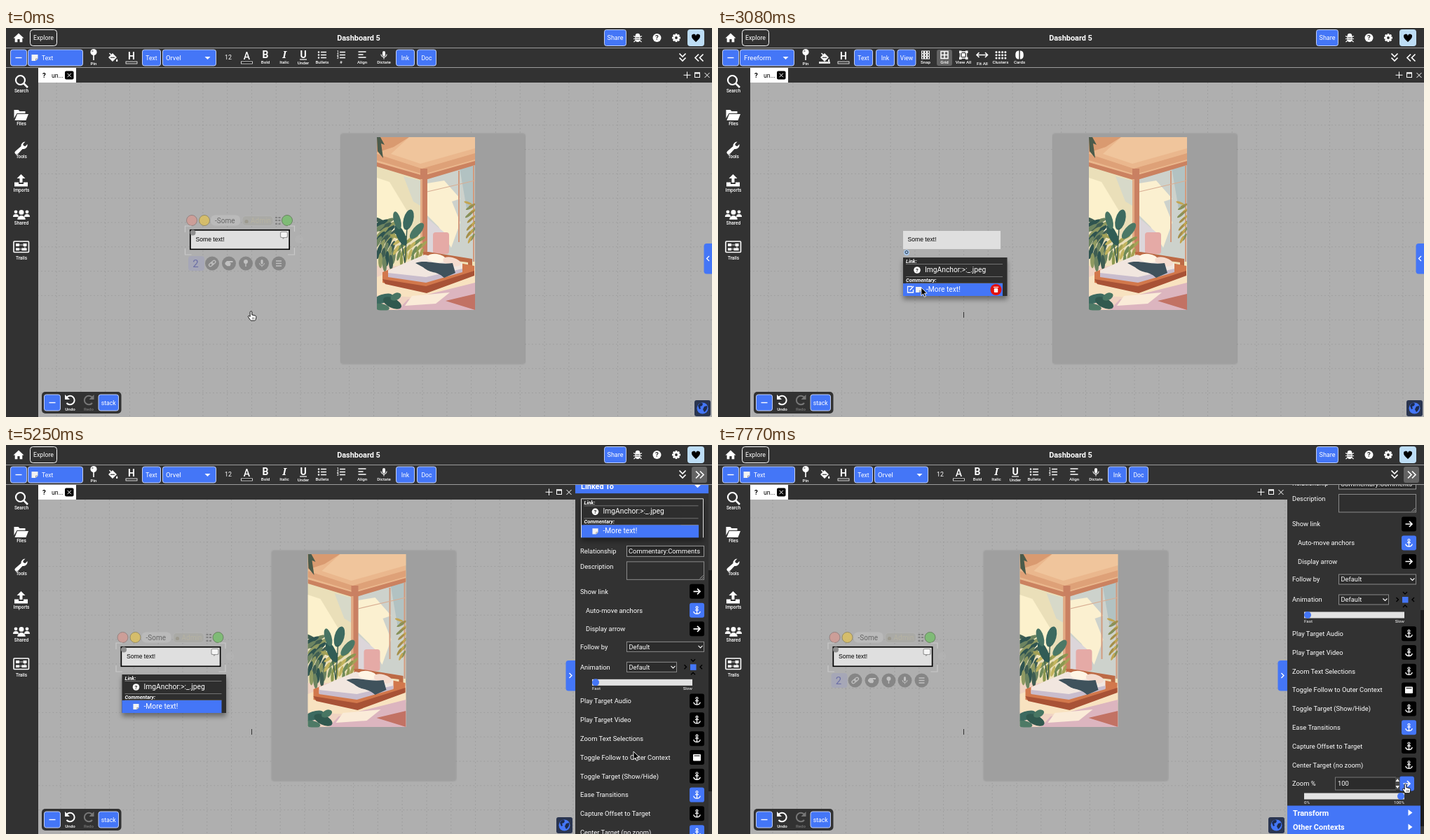
Write an HTML page that moves like this. It is 1007x556 px and loops after 8000 ms.

```html
<!DOCTYPE html>
<html lang="en">
<head>
<meta charset="utf-8">
<title>Dashboard</title>
<style>
html, body { margin: 0; width: 100%; height: 100%; overflow: hidden; background: #323232; }
svg { display: block; width: 100vw; height: 100vh; font-family: Roboto, sans-serif; }
</style>
</head>
<body>
<svg id="stage" viewBox="0 0 1007 556"></svg>
<script>
const DARK = '#323232', BLUE = '#4476f7', LIGHT = '#dfdfdf', MID = '#9f9f9f', WHITE = '#fff';

const rect = (x, y, w, h, fill, rx = 0, more = '') =>
  `<rect x="${x}" y="${y}" width="${w}" height="${h}" rx="${rx}" fill="${fill}" ${more}/>`;
const circle = (x, y, r, fill, more = '') => `<circle cx="${x}" cy="${y}" r="${r}" fill="${fill}" ${more}/>`;
const fillPath = (d, fill = WHITE, more = '') => `<path d="${d}" fill="${fill}" ${more}/>`;
const line = (d, stroke = WHITE, w = 1.4, more = '') =>
  `<path d="${d}" fill="none" stroke="${stroke}" stroke-width="${w}" ${more}/>`;
const at = (x, y, body) => `<g transform="translate(${x} ${y})">${body}</g>`;
const group = (id, body) => `<g id="${id}">${body}</g>`;
// y is the vertical middle of the text
const text = (x, y, size, s, fill = WHITE, more = '') =>
  `<text x="${x}" y="${y + size * .355}" font-size="${size}" fill="${fill}" ${more}>${s}</text>`;
const MIDDLE = 'text-anchor="middle"', BOLD = 'font-weight="700"', ITALIC = 'font-weight="700" font-style="italic"';
const label = (x, y, s, size = 6.2, fill = WHITE) => text(x, y, size, s, fill, MIDDLE + ' font-weight="500"');
const button = (x, y, w, h, s = '', size = 8.6) =>
  rect(x + .5, y + .5, w - 1, h - 1, BLUE, 3, 'stroke="#d3ddfb" stroke-width=".9"') +
  (s ? text(x + w / 2, y + h / 2, size, s, WHITE, MIDDLE) : '');
const minus = (x, y) => button(x, y, 24, 24) + line(`M${x + 7.5} ${y + 12}h9`);
const note = (x, y, s = 1) => at(x, y,
  `<g transform="scale(${s})">${fillPath('M-4.5-4.5h9v6l-3 3h-6z', '#f2f2f2')}${line('M1.5 4.5v-3h3', '#888', .8)}</g>`);
const mark = (x, y, r, fill = WHITE, ink = DARK) =>
  circle(x, y, r, fill) + text(x, y, r * 1.6, '?', ink, MIDDLE + ' ' + BOLD);

function topBar() {
  let teeth = '';
  for (let a = 0; a < 360; a += 45) teeth += rect(-1.4, -6, 2.8, 3, WHITE, .5, `transform="rotate(${a})"`);
  return rect(0, 0, 1007, 57, DARK) + line('M0 28.5H1007M0 56.5H1007', '#a8a8a8', .9) +
    at(18, 14, fillPath('M0-6.5L7.5.5H5.3V6.2H1.6V2H-1.6V6.2H-5.3V.5H-7.5z')) +
    rect(34.5, 2.5, 38, 23, 'none', 4, 'stroke="#fff"') + text(53.5, 14, 8.8, 'Explore', WHITE, MIDDLE) +
    text(503, 14, 10.9, 'Dashboard 5', WHITE, MIDDLE + ' ' + BOLD) +
    button(853, 2, 32, 24, 'Share', 9) +
    at(901, 14, fillPath('M-3.5-2a3.5 4.3 0 0 1 7 0v4a3.5 4 0 0 1-7 0z') +
      line('M-6-2.5L-3-1M6-2.5L3-1M-6 1.5H6M-5.5 6L-3 3.6M5.5 6L3 3.6', WHITE, 1.1) + line('M-2.5-.4h5M-2.5 2h5', DARK, .8)) +
    mark(928.5, 14, 6) + at(956, 14, teeth + circle(0, 0, 4.5, WHITE) + circle(0, 0, 1.9, DARK)) +
    rect(972, 2, 24, 24, '#bdddf5', 4) +
    at(984, 14.5, fillPath('M0 5.5C-4 2-6-.2-6-2.4A3 3 0 0 1 0-3.3 3 3 0 0 1 6-2.4C6-.2 4 2 0 5.5z', '#000'));
}

function commonTools() {
  return minus(6, 30.5) +
    circle(125, 34.5, 4.6, WHITE) + line('M125 38v8', WHITE, 1.6) + circle(123.4, 33, 1.2, '#999') + label(125, 50.5, 'Pin') +
    at(152, 42, fillPath('M-6 0L0-6 6 0 0 6zM6.3 2c1.3 1.8 1.6 4-.2 4s-1.2-2.4.2-4z') + line('M-4.5-6L0-1.5') + line('M-3 .2h6', DARK, 1.2)) +
    text(179, 40.5, 14, 'H', WHITE, MIDDLE + ' ' + BOLD) + rect(171, 48, 16, 3, DARK, 0, 'stroke="#fff" stroke-width=".8"') +
    button(194, 30.5, 27, 24, 'Text') +
    line('M960.5 36.5l4.5 4.5 4.5-4.5M960.5 42.5l4.5 4.5 4.5-4.5', WHITE, 1.7) +
    group('sideHi', rect(978, 31, 22, 23, '#636363', 3)) +
    '<path id="sideChev" fill="none" stroke="#fff" stroke-width="1.7"/>';
}

function textTools() {
  const bars = (x, y, ws) => line(ws.map((w, i) => `M${x} ${y + i * 4}h${w}`).join(''), WHITE, 1.6);
  const glyph = (x, s, more) => text(x, 38.5, 14, s, WHITE, MIDDLE + ' ' + more);
  return button(31, 30.5, 79, 24) + note(41, 42.5) + text(51, 42.5, 8.6, 'Text') +
    button(223, 30.5, 77, 24) + text(228, 42.5, 9.5, 'Orvel') + fillPath('M283.5 41h8l-4 4z') +
    text(317, 42, 8.8, '12', WHITE, MIDDLE) +
    text(343.5, 40, 14, 'A', WHITE, MIDDLE + ' font-weight="500"') + rect(335.5, 48, 16, 3, '#000', 0, 'stroke="#fff" stroke-width=".8"') +
    glyph(370, 'B', BOLD) + label(370, 49, 'Bold') +
    glyph(397, 'I', ITALIC + ' font-family="Noto Serif, serif"') + label(397, 49, 'Italic') +
    glyph(424, 'U', BOLD) + line('M419 45h10', WHITE, 1.2) + label(424, 49.5, 'Under') +
    bars(449, 34.5, [8, 8, 8]) + [34.5, 38.5, 42.5].map(y => circle(446, y, 1.2, WHITE)).join('') + label(451, 49, 'Bullets') +
    bars(476, 34.5, [8, 8, 8]) + [1, 2, 3].map(n => text(472, 30.5 + n * 4, 4.5, n, WHITE, BOLD)).join('') + label(478, 49, '#') +
    bars(502.5, 34, [11, 7, 11]) + label(508, 49, 'Align') +
    at(539, 38, rect(-2, -5, 4, 7.5, WHITE, 2) + line('M-4-.5a4 4 0 0 0 8 0M0 3.5v3', WHITE, 1.1)) + label(539, 49, 'Dictate') +
    button(556, 30.5, 27, 24, 'Ink') + button(586, 30.5, 28, 24, 'Doc');
}

function freeTools() {
  let snap = '', dots = '';
  for (let i = 0; i < 9; i++) snap += rect(290.5 + i % 3 * 4, 33 + Math.floor(i / 3) * 4, 3, 3, 'none', 0, 'stroke="#fff"');
  for (let i = 0; i < 12; i++) dots += circle(397 + i % 4 * 4.3, 34.5 + Math.floor(i / 4) * 4.2, 1.5, WHITE);
  return button(31, 30.5, 78, 24) + text(37, 42.5, 9.6, 'Freeform') + fillPath('M92.5 41h8l-4 4z') +
    rect(144, 48, 16, 3, LIGHT) + button(225, 30.5, 27, 24, 'Ink') + button(255.5, 30.5, 27, 24, 'View') +
    snap + label(296, 49, 'Snap') +
    rect(312, 31, 22, 23, '#636363', 3) + line('M318 33.5h10v10h-10zM323 33.5v10M318 38.5h10', WHITE, 1.5) + label(323, 49, 'Grid') +
    line('M345.5 34h9v9h-9z', WHITE, 1.3) + [[344, 32.5], [353, 32.5], [344, 41.5], [353, 41.5]].map(p => rect(...p, 3.5, 3.5, WHITE)).join('') +
    rect(347.5, 36, 5, 5, WHITE) + label(350, 49, 'View All') +
    line('M369.5 38.5h14M372.5 35l-3.5 3.5 3.5 3.5M381 35l3.5 3.5-3.5 3.5', WHITE, 1.6) + label(377, 51, 'Fit All') +
    dots + label(403, 49, 'Clusters') +
    fillPath('M429.3 32.5v12c-3.5 0-5-2-5-6s1.5-6 5-6zM430.8 32.5v12c3.5 0 5-2 5-6s-1.5-6-5-6z') + label(430, 49, 'Cards');
}

function sidebar() {
  const person = (x, y, s) => circle(x, y - 4 * s, 3 * s, WHITE) + fillPath(`M${x - 5 * s} ${y + 5 * s}a${5 * s} ${5 * s} 0 0 1 ${10 * s} 0z`);
  const names = ['Search', 'Files', 'Tools', 'Imports', 'Shared', 'Trails'], ys = [89.5, 136.5, 184, 232, 278.5, 328.5];
  return rect(0, 57, 46, 499, DARK) +
    circle(20.5, 74.5, 6.5, 'none', 'stroke="#fff" stroke-width="2.2"') + line('M25 79l6 6', WHITE, 2.6) +
    at(21.5, 124, fillPath('M-10-7h6l2 2H6v3H-6L-10 5zM-5.5-1H10.5L7 8H-9z')) +
    at(21.5, 171, fillPath('M-8 5L0-2A6 6 0 0 1 6-8.5L2.7-5 3.5-2.7 6-2 9-5A6 6 0 0 1 2 2L-4.5 9A2.6 2.6 0 0 1-8 5z')) +
    at(21.5, 218, fillPath('M-2 3V-3H-6L0-9 6-3H2V3zM-9.5 2.5h6v2.5h7V2.5h6V8.5h-19z')) +
    person(14, 266, .8) + person(30, 266, .8) + person(22, 268, 1.15) +
    rect(11, 305, 21.5, 15.5, 'none', 1, 'stroke="#fff" stroke-width="1.6"') +
    rect(14, 308, 5, 4, WHITE) + rect(24.5, 308, 5, 4, WHITE) + rect(14, 314.5, 5, 3.5, WHITE) + rect(22.5, 314.5, 7, 3.5, WHITE) +
    line('M19 310h5M27 312v3M19 316h4', WHITE, .8) +
    names.map((n, i) => label(22, ys[i], n, 6.5)).join('');
}

function picture() {
  const leaf = (x, y, rx, ry, a, c) => `<ellipse cx="${x}" cy="${y}" rx="${rx}" ry="${ry}" fill="${c}" transform="rotate(${a} ${x} ${y})"/>`;
  // A cluster of leaves scattered evenly over a w by h area
  const bush = (x, y, w, h, n, size, colors) => Array.from({ length: n }, (_, i) =>
    leaf(x + i * .618 % 1 * w, y + i / n * h, size * .28, size, i * 137 % 140 - 70, colors[i % colors.length])).join('');
  return rect(0, 0, 140, 247, '#f0e2b9') +
    fillPath('M0 40L62 58V168H0z', '#eadfb9') + fillPath('M0 58L18 64 47 112 36 152 0 128z', '#fcf1cc') + fillPath('M38 56L62 62V98L52 92z', '#d7d9c9') +
    fillPath('M70 56L140 38V178H70z', '#cdd2cc') + fillPath('M118 44L140 38V96L128 102z', '#b2c2c2') +
    fillPath('M72 66L96 62 119 88 107 92 119 122 106 158 88 128 72 112z', '#fbf0d0') + fillPath('M72 116L96 136 100 165H72z', '#dcd6da') +
    fillPath('M0 0H140V38L66 60 0 38z', '#eab78d') + fillPath('M0 0H46L24 14 0 22z', '#d99a70') + fillPath('M46 0H140V16L62 38 20 24z', '#f0c59c') +
    fillPath('M0 24L64 45 140 23V32L66 53 0 33z', '#dea178') + fillPath('M0 36L66 55 140 34V40L66 62 0 42z', '#cb8260') +
    fillPath('M62 45h10v121h-10z', '#c98062') + rect(62, 60, 3, 106, '#e3ab85') + line('M117 48V150M138 40V178', '#d29a7e', 2) + line('M72 78L140 62', '#d8ad92', 1.2) +
    fillPath('M0 0h5l6 11-5-2 3 21L1 20z', '#4b5b4b') +
    rect(0, 184, 140, 63, '#f0d3c2') + fillPath('M0 200L45 182 140 188V212L80 230 0 226z', '#f8e2c0') +
    fillPath('M44 232L140 208V247H30z', '#dcb5bf') + fillPath('M98 234L140 224V247z', '#c27264') + fillPath('M50 227L104 222 84 238 40 241z', '#faebd8') +
    bush(0, 118, 24, 66, 26, 11, ['#3f5d52', '#6d8460', '#2f5450', '#8f9a62']) + bush(26, 142, 42, 36, 24, 8, ['#a5a256', '#c3b45f', '#6f8a59', '#8b9850']) +
    bush(130, 94, 10, 56, 16, 6, ['#c2a552', '#a48f4a', '#87915a']) +
    leaf(45, 118, 7, 15, 15, '#3c6a60') + leaf(34, 140, 6, 16, -25, '#315c55') + leaf(57, 134, 6, 14, 40, '#4b7866') + leaf(29, 119, 5, 13, -15, '#477363') +
    line('M43 130L40 180M35 150L40 180', '#31564f', 1.3) +
    rect(80, 136, 23, 31, '#e5aaa6', 4) + fillPath('M66 164h8l62 10v14h-6v-9L66 171z', '#bd6a45') +
    fillPath('M8 193L66 170 139 184V197L71 222 8 208z', '#d2784c') + fillPath('M8 203L70 213 139 191V198L71 223 12 210z', '#a85236') +
    fillPath('M16 190L68 168 122 180V192L70 207 16 199z', '#f1e6df') + fillPath('M16 194L70 200 122 188V193L70 208 16 200z', '#c9bdcd') +
    leaf(85, 173, 13, 6, 8, '#fff5e4') + leaf(107, 178, 13, 6, 15, '#f4dccf') +
    fillPath('M55 180C70 174 85 183 108 180L112 194 96 201C84 190 78 196 66 186z', '#3f525c') +
    leaf(8, 231, 15, 6, -20, '#3c6a60') + leaf(22, 237, 14, 7, 25, '#31594f') + leaf(6, 243, 12, 5, 10, '#4e7a66') + leaf(27, 228, 8, 5, -25, '#487663');
}

// Link menu, laid out at its place on the canvas
function linkMenu(row) {
  const rule = y => line(`M268 ${y}H406`, '#a0a0a0', .6);
  return text(268, 333, 7.4, 'Link:', WHITE, ITALIC) + rule(337.5) + mark(284, 346, 4.8) + text(295, 345.5, 10.25, 'ImgAnchor:&gt;:_.jpeg') +
    rule(355.5) + text(268, 360.5, 7.4, 'Commentary:', WHITE, ITALIC) + rule(365) + row;
}
const moreRow = note(284, 374, .9) + text(295, 373.2, 10.25, '-More text!');

function decorations() {
  const round = [294, 318, 342, 365, 389].map(x => circle(x, 336.5, 10, '#828282')).join('');
  const link = rect(-5.5, -2, 6.5, 4, 'none', 2, 'stroke="#c3c3c3" stroke-width="1.3"') + rect(-1, -2, 6.5, 4, 'none', 2, 'stroke="#c3c3c3" stroke-width="1.3"');
  return `<g opacity=".8">` +
    circle(265, 275, 7.5, '#d49a93', 'stroke="#8d7775"') + circle(283, 275, 7.5, '#dfc15b', 'stroke="#8d8357"') +
    rect(292, 267.5, 42, 15, '#bdbdbd', 6) + text(298, 275, 10, '-Some', '#555') +
    rect(337, 268.5, 44, 14, '#a9a9a5', 5, 'stroke="#bbb" stroke-width=".6"') + circle(343, 276.5, 2.6, '#989487') + text(349, 275.5, 10, 'Admin', '#bab59f') +
    line('M384 271h8M384 275h8M384 280h8', '#666', 1.5, 'stroke-dasharray="3 1.5"') + circle(401, 275, 7.5, '#74bf68', 'stroke="#58764f"') + '</g>' +
    line('M255.5 292v-9h9M402 324h9.5v-10M255.5 315v9h9M402 283h9.5v8', '#c9c9c9', 1.2) + circle(418, 302, 6, '#b7b7b7', 'opacity=".4"') +
    circle(266.5, 292.5, 4, '#8e8e8e') +
    group('decoBtns', `<g opacity=".9">${rect(260, 326, 23, 21, '#a6a7b8', 4)}${text(270.5, 336.5, 15, '2', '#6468a6', MIDDLE)}${round}` +
      at(294.2, 336.5, `<g transform="rotate(-40)">${link}</g>`) +
      fillPath('M312.5 335.5l2.5-2.5h8.5v2h-4v1.300h1.500l-1.500 4h-4l-3-2.500z', '#c3c3c3') + circle(342, 334, 3, '#c3c3c3') + line('M342 335v6', '#c3c3c3') +
      rect(363.5, 331, 3, 6.5, '#c3c3c3', 1.5) + line('M361.5 336a3.5 3.5 0 0 0 7 0M365 339.5v2', '#c3c3c3', 1) +
      line('M385 333h8M385 336.5h8M385 340h8', '#c3c3c3', 1.3) + '</g>');
}

function world() {
  let grid = '';
  for (let i = 0; i < 34; i++) grid += `M${2.5 + i * 34.8} 78V556`;
  for (let i = 0; i < 13; i++) grid += `M-20 ${104 + i * 34.8}H1140`;
  return line(grid, '#999', .8, 'stroke-dasharray="1.7 3.3"') +
    rect(478, 151.5, 262, 328, MID, 2, 'filter="url(#soft)"') + at(529, 156, `<g clip-path="url(#pic)">${picture()}</g>`) +
    rect(264, 290, 139, 26, LIGHT) +
    group('noteSel', rect(262.8, 288.7, 141.4, 27.6, 'none', 0, 'stroke="#000" stroke-width="1.6"') +
      rect(391.5, 291.5, 10, 8, '#f4f4f4', 2, 'stroke="#999" stroke-width="1.2"') + fillPath('M394 299.5l1 2.5 3-2.5z', '#999')) +
    text(270.5, 302, 8.6, 'Some text!', '#000', 'font-family="Liberation Sans, sans-serif"') +
    group('linkDot', circle(269, 321, 4.2, '#a9c7ea') + circle(269, 320.5, 2, 'none', 'stroke="#234"')) +
    group('deco', decorations()) +
    group('menu', rect(264, 328, 148.5, 55, '#2d2d2d', 0, 'filter="url(#drop)"') +
      linkMenu(group('rowBg', rect(264, 365, 142, 18, BLUE)) + group('row', moreRow) +
        group('rowTools', line('M277 369.5h-6.5v8.5h8v-4M273.5 375l5.5-6', WHITE, 1.3) +
          circle(396.5, 374, 8, '#e3120b') + rect(393.8, 372, 5.4, 6, WHITE, 1) + line('M393 370.5h7', WHITE, 1.2)))) +
    group('tip', rect(250.5, 391, 49, 22, '#616161', 3) + text(275, 402, 8.4, 'Edit Link', WHITE, MIDDLE + ' ' + BOLD));
}

const ANCHOR = line('M0-2.5V5M-2.5-.5h5M-4.8 1.5C-4 4.5-2 5 0 5S4 4.5 4.8 1.5', WHITE, 1.3) + circle(0, -4, 1.5, 'none', 'stroke="#fff" stroke-width="1.1"');
const ARROW = line('M-5 0H4.5M.5-4L4.5 0 .5 4', WHITE, 1.7);
const WINDOW = rect(-5.5, -4.5, 11, 9.5, WHITE, 1) + line('M-4-2.3h8', '#000', 1);
const tile = (y, icon, fill = '#000', x = 985.5) => rect(x - 10.5, y - 10.5, 21, 21, fill, 3) + at(x, y, icon);
const slider = (y, knob, a, b) => rect(836, y - 4.5, 143, 9, '#e2e2e2') + circle(knob, y, 5, BLUE) +
  text(836, y + 8.7, 6.2, a) + text(979, y + 8.7, 6.2, b, WHITE, 'text-anchor="end"');
const band = (y, s, tri = 'M984.5-4.5L990.5 0 984.5 4.5z') => rect(812, y, 190, 20.8, BLUE) +
  text(820, y + 10.4, 10.9, s, WHITE, BOLD) + at(0, y + 10, fillPath(tri));
const row = (y, s, x = 819) => text(x, y, 9.4, s);
const select = (y, w) => rect(885.5, y - 7, w, 14, '#2b2b2b', 0, 'stroke="#8a8a8a"') + text(888.5, y, 9.3, 'Default') +
  line(`M${877.5 + w} ${y - 1.5}l3 3 3-3`, WHITE, 1.1);

function panel() {
  const options = [['Play Target Audio', ANCHOR], ['Play Target Video', ANCHOR], ['Zoom Text Selections', ANCHOR], ['Toggle Follow to Outer Context', WINDOW],
    ['Toggle Target (Show/Hide)', ANCHOR], ['Ease Transitions', ANCHOR, BLUE], ['Capture Offset to Target', ANCHOR]];
  return rect(812, 57, 195, 499, DARK) + `<g clip-path="url(#side)">` + group('scroll',
    text(820, 78, 18.7, 'Properties', WHITE, BOLD) + circle(920, 92, 6, WHITE) + text(920, 92, 9, 'i', DARK, MIDDLE + ' ' + BOLD) +
    text(820.5, 121, 8.1, 'TITLE', '#d5d5d5') + rect(820.5, 127.5, 174, 23.5, 'none', 4, 'stroke="#e4e4e4"') + text(825, 139.5, 9.5, '-Some text!') +
    text(820, 161.5, 9.3, '<tspan font-weight="700">Anchor:</tspan>-Some text!') +
    text(820, 175, 9.3, '<tspan font-weight="700">Link:</tspan>-Some text! (Commentary:Comme...') +
    row(196, 'Type', 820) + fillPath('M821.5 205.5h5l2.5 2.5v7h-7.5z') + line('M823 210h4M823 212.5h4', DARK, .8) +
    text(833, 210, 9.6, 'Text', WHITE, 'text-decoration="underline"') +
    band(220.5, 'Options') + band(241, 'Linked To', 'M981.5-2L991.5-2 986.5 3z') +
    rect(820.5, 269.5, 174, 55.5, '#2d2d2d', 0, 'filter="url(#drop)"') + line('M820.5 325V269.5H994.5V325', '#e0e0e0', 1) +
    at(556.5, -58, linkMenu(rect(264.5, 365, 167, 18, BLUE) + moreRow) + line('M406 337.5h25M406 355.5h25M406 365h25', '#a0a0a0', .6)) +
    row(344, 'Relationship') + rect(885.5, 337, 110, 15, '#272727', 0, 'stroke="#999"') + text(888, 344.8, 9.4, 'Commentary:Comments') +
    row(366, 'Description') + rect(885.5, 359.5, 110, 25.5, '#2f2f2f', 0, 'stroke="#8a8a8a"') + line('M989.5 384l5-5M992.5 384l2-2', '#bbb', .8) +
    row(402, 'Show link') + tile(402, ARROW) + row(429, 'Auto-move anchors', 827) + tile(429, ANCHOR, BLUE) +
    row(455.5, 'Display arrow', 827) + tile(455.5, ARROW) +
    row(481, 'Follow by') + select(481, 110) + row(510, 'Animation') + select(510, 71) +
    rect(976, 506, 8.5, 8.5, BLUE) + line('M977 499l3 3 3-3M977 521l3-3 3 3M967.5 507l3 3-3 3M993 507l-3 3 3 3', '#000', 1.4) +
    slider(532, 841, 'Fast', 'Slow') +
    options.map(([s, icon, fill], i) => row(558.7 + i * 26.8, s) + tile(558.7 + i * 26.8, icon, fill)).join('') +
    row(746.3, 'Center Target (no zoom)') + group('centerOn', tile(746.3, ANCHOR, BLUE)) + group('centerOff', tile(746.3, ANCHOR)) +
    row(773, 'Zoom %') + tile(773, ARROW, '#000', 982.5) +
    group('zoom', tile(773, ARROW, BLUE, 982.5) + rect(880.5, 764, 86, 18, '#2b2b2b', 0, 'stroke="#777"') + text(884, 773, 9.4, '100') +
      rect(966, 764, 6.5, 18, '#4a4a4a') + fillPath('M966.5 770l2.7-4 2.7 4zM966.5 776l2.7 4 2.7-4z') + slider(791, 974, '0%', '100%')) +
    group('tail', band(786.5, 'Transform') + band(807, 'Other Contexts') + band(827.5, 'Fields &amp; Tags'))) + '</g>' +
    rect(1002, 57, 5, 499, '#3a3a3a') + '<rect id="thumb" x="1002" width="5" fill="#1d1d1d"/>';
}

function corner() {
  return line('M971.5 62.5v9.5M966.5 67.3h10M996.5 64l7 7M1003.5 64l-7 7', WHITE, 1) +
    rect(982.5, 64, 7, 6.5, 'none', 0, 'stroke="#fff"') + line('M982 64.5h8', WHITE, 2) +
    rect(982, 532, 23, 23, '#2a3550', 3) + circle(993.5, 543.5, 8, BLUE) +
    fillPath('M987 540c2-4 5-5 7-3l-1 3-3 1 1 3-2 1zM996 541l4-1c1 4-1 7-4 9l-2-4z', '#1d2b4e') +
    fillPath('M1009 308h-9.5q-4 0-4 4v35.500q0 4 4 4h9.5z', BLUE) + '<path id="handleChev" fill="none" stroke="#fff" stroke-width="1.3"/>';
}

function dock() {
  const curl = (c, flip) => `<g transform="scale(${flip} 1)">${line('M-5-4A6.3 6.3 0 1 1-5 4', c, 2)}${fillPath('M-7.5-8v7h7z', c)}</g>`;
  return rect(51, 520, 113.5, 31, DARK, 5) + minus(54, 523.5) + at(91.5, 532, curl(WHITE, 1)) + label(91.5, 544.5, 'Undo') +
    at(118, 532, curl('#777', -1)) + label(118, 544.5, 'Redo', 6.2, '#777') + button(131.5, 523.5, 29.5, 24, 'stack', 8.7);
}

document.getElementById('stage').innerHTML =
  `<defs><clipPath id="pic"><rect width="140" height="247.5"/></clipPath><clipPath id="side"><rect x="812" y="57" width="190" height="499"/></clipPath>
  <filter id="soft"><feDropShadow dx="0" dy="0" stdDeviation="1.2" flood-opacity=".3"/></filter>
  <filter id="drop" x="-10%" y="-20%" width="120%" height="160%"><feDropShadow dx="0" dy="5" stdDeviation="3.5" flood-opacity=".4"/></filter></defs>` +
  rect(0, 0, 1007, 556, '#afafaf') + group('world', world()) + line('M350.5 406v8', '#333', 1) +
  rect(46, 57, 961, 21, DARK) + rect(46, 57, 54, 21, WHITE) + text(52, 67.5, 9.6, '?', '#000', BOLD) + text(65, 67.5, 8.8, 'un...', '#000') +
  rect(84, 61.5, 12.5, 12, '#000', 2) + line('M87.5 64.8l5.5 5.5M93 64.8l-5.5 5.5', WHITE, 1) +
  topBar() + commonTools() + group('textTools', textTools()) + group('freeTools', freeTools()) + sidebar() + dock() +
  group('panel', panel()) + group('corner', corner()) +
  group('cursor', group('arrow', fillPath('M0 0V11.5L2.7 9 4.6 13.3 6.6 12.4 4.7 8.2H8.3z', '#000', 'stroke="#fff" stroke-width=".9"')) +
    group('hand', fillPath('M-1.3 1.2a1.3 1.3 0 0 1 2.6 0V5l4.2 1c1.3.3 2 1 1.8 2.4l-.6 3.2c-.2 1-1 1.6-2 1.6H.6c-.8 0-1.4-.4-1.8-1L-4 8c-.6-1.1.6-2.1 1.5-1.3L-1.3 7.6z', WHITE, 'stroke="#000" stroke-width=".9"') +
      line('M2.2 8.5v3M4.2 8.5v3', '#000', .6)));

const el = {};
document.querySelectorAll('g[id], path[id], rect[id]').forEach(n => el[n.id] = n);
const show = (id, on) => el[id].style.display = on ? '' : 'none';
const move = (id, x, y = 0) => el[id].setAttribute('transform', `translate(${x} ${y})`);
const ramp = (t, a, b) => Math.min(1, Math.max(0, (t - a) / (b - a)));
const smooth = u => u * u * (3 - 2 * u);

const LOOP = 8000, STEP = 70;
const DESELECT = 70, MENU = 2100, OPEN = 3570, LEAVE = 3780, ZOOM = 7490;
const path = [[140, 349.5, 405], [980, 300, 326], [1470, 272, 312], [1750, 268.5, 318.5], [2380, 268.5, 318.5], [2800, 318, 371],
  [3220, 280, 371], [3430, 275, 375], [3710, 275, 375], [4200, 821, 409], [4270, 821, 409], [4480, 895, 438],
  [6370, 895, 438], [6440, 921, 457], [7070, 987, 490], [7140, 987, 490], [7210, 980.5, 484.5]];

function pointer(t) {
  let i = 1;
  while (i < path.length - 1 && path[i][0] < t) i++;
  const [a, x0, y0] = path[i - 1], [b, x1, y1] = path[i], u = smooth(ramp(t, a, b));
  return [x0 + (x1 - x0) * u, y0 + (y1 - y0) * u];
}

function render(t) {
  const open = t >= OPEN, selected = t < DESELECT || open, zoom = t >= ZOOM;
  const menu = t >= MENU && !zoom, hover = t >= 2730 && t < LEAVE;
  const scroll = 289 * (1 - Math.pow(1 - ramp(t, 4760, 5950), 2.07));
  const hand = t < 2450 || t >= 7000;

  move('world', -98.5 * smooth(ramp(t, 3710, 4200)));
  show('noteSel', selected);
  show('linkDot', !selected);
  show('deco', t < DESELECT || t >= LEAVE);
  show('decoBtns', !menu);
  show('menu', menu);
  show('rowBg', hover || open);
  show('rowTools', hover);
  move('row', hover ? 2 : 0);
  show('tip', t >= 3150 && t < LEAVE);
  show('textTools', selected);
  show('freeTools', !selected);

  show('panel', open);
  move('corner', open ? -197 : 0);
  show('sideHi', t >= LEAVE);
  el.sideChev.setAttribute('d', open ? 'M984 37.5l5 5-5 5M990 37.5l5 5-5 5' : 'M988 37.5l-5 5 5 5M994.5 37.5l-5 5 5 5');
  el.handleChev.setAttribute('d', open ? 'M1000.5 326l3.5 3.5-3.5 3.5' : 'M1003 326l-3.5 3.5 3.5 3.5');
  move('scroll', 0, -scroll);
  show('zoom', zoom);
  show('centerOn', !zoom);
  show('centerOff', zoom);
  move('tail', 0, zoom ? 18 : 0);
  const ratio = 499 / (zoom ? 806 : 788);
  el.thumb.setAttribute('y', 57 + scroll * ratio);
  el.thumb.setAttribute('height', 499 * ratio);

  move('cursor', ...pointer(t));
  show('hand', hand);
  show('arrow', !hand);
}

const start = performance.now();
function tick(now) {
  const t = Math.max(0, now - start) % LOOP;
  render(Math.floor(t / STEP) * STEP);
  requestAnimationFrame(tick);
}
render(0);
requestAnimationFrame(tick);
</script>
</body>
</html>
```
